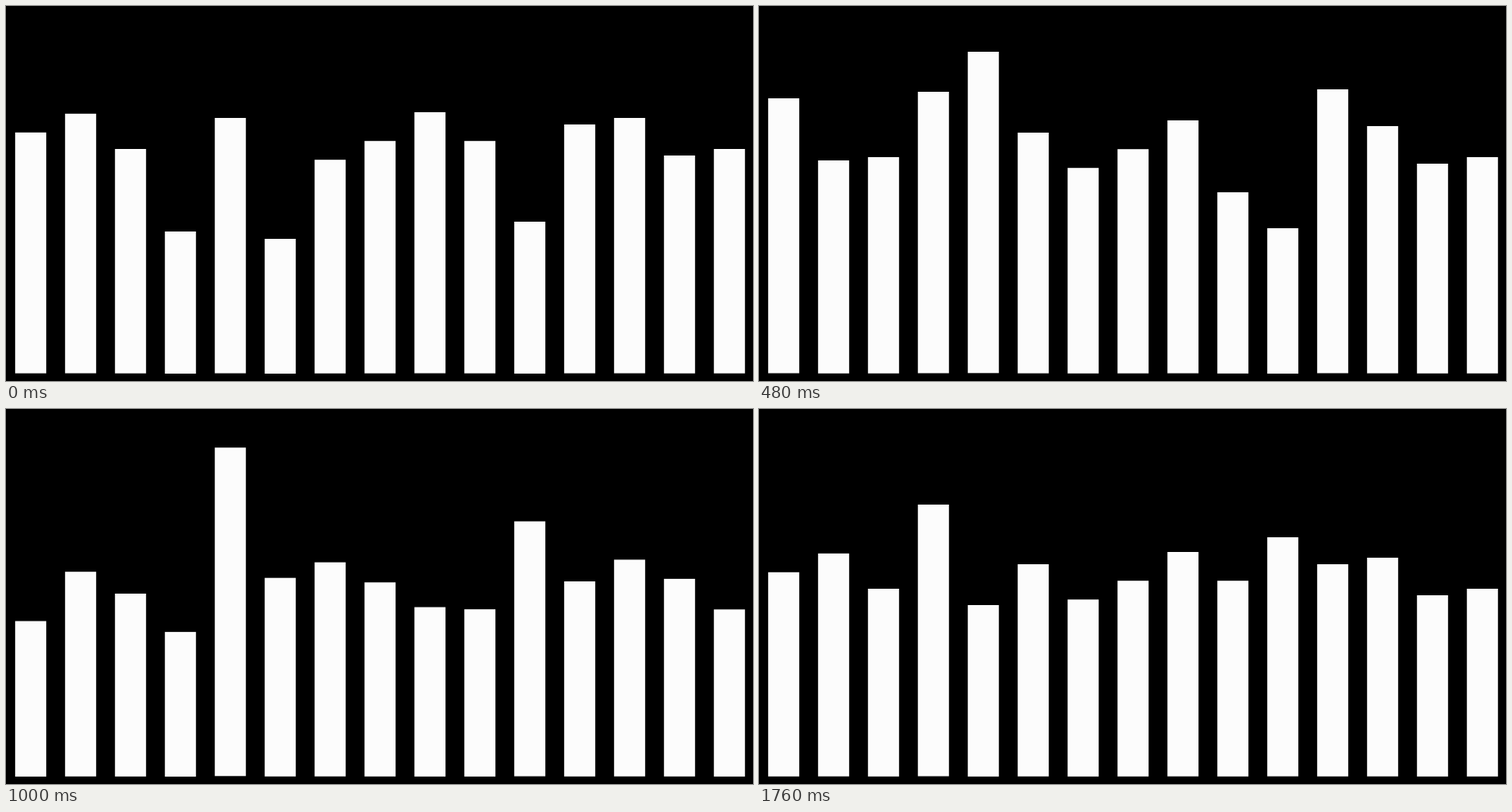
These frames come from a looping animation (913x459 px, 1.8 s). A matplotlib script:

```python
import numpy as np
import matplotlib.pyplot as plt
from matplotlib.animation import FuncAnimation

W, H, DPI = 913, 459, 64
FRAMES, STEP_MS = 45, 40
BARS, FIRST_X, PITCH, BAR_W = 15, 11.2, 61, 38
RIPPLE, SWELL, CEILING = 30, 70, 13

# Beats: frame, mean bar top in pixels, and the bars that stand out from it
BEATS = [
    (0, 160, {3: 276, 5: 285, 10: 264}),
    (5, 165, {0: 99, 6: 251, 10: 309, 11: 340, 12: 198}),
    (12, 170, {0: 113, 1: 189, 3: 105, 4: 56, 9: 228, 10: 272, 11: 102}),
    (20, 235, {0: 293, 4: 70, 6: 171, 8: 288, 10: 160, 11: 272}),
    (31, 180, {0: 222, 3: 284, 9: 253, 10: 77, 13: 150}),
    (38, 160, {6: 136, 7: 121, 10: 267, 13: 106}),
    (44, 205, {3: 117, 4: 240, 10: 157}),
]


def profile(level, accents):
    """Bar tops at a beat: a ripple across the bars, broken by the accents."""
    tops = level - RIPPLE * np.cos(np.radians(100 * np.arange(BARS) - 80))
    for bar, top in accents.items():
        tops[bar] = top
    return tops


def glide(start, end, steps, rng):
    """Ease from one profile to the next; the tallest bar swells on the way."""
    u = np.linspace(0, 1, steps + 1)[:, None]
    size = 1.5 * steps
    tops = start + (end - start) * u * u * (3 - 2 * u)
    for k in (1, 2, 3):
        tops += rng.uniform(-size, size, BARS) / k * np.sin(np.pi * k * u)
    tops[:, np.argmin(start + end)] -= SWELL * np.sin(np.pi * u[:, 0])
    return np.maximum(tops, CEILING)


rng = np.random.default_rng(7)
tops = np.empty((FRAMES, BARS))
for (a, *here), (b, *there) in zip(BEATS, BEATS[1:]):
    tops[a:b + 1] = glide(profile(*here), profile(*there), b - a, rng)

fig = plt.figure(figsize=(W / DPI, H / DPI), dpi=DPI, facecolor="black")
ax = fig.add_axes([0, 0, 1, 1])
ax.set(xlim=(0, W), ylim=(H, 0))
ax.axis("off")

bars = [
    ax.add_patch(plt.Rectangle((FIRST_X + PITCH * i, 0), BAR_W, 0,
                               facecolor="#fcfcfc", linewidth=0, snap=False))
    for i in range(BARS)
]


def draw(frame):
    for bar, top in zip(bars, tops[frame]):
        # the foot sinks slightly as a bar gets shorter
        base = 449.15 + 0.003 * top
        bar.set_y(top)
        bar.set_height(base - top)
    return bars


anim = FuncAnimation(fig, draw, frames=FRAMES, interval=STEP_MS,
                     repeat=True, repeat_delay=0, blit=False)
plt.show()
```
